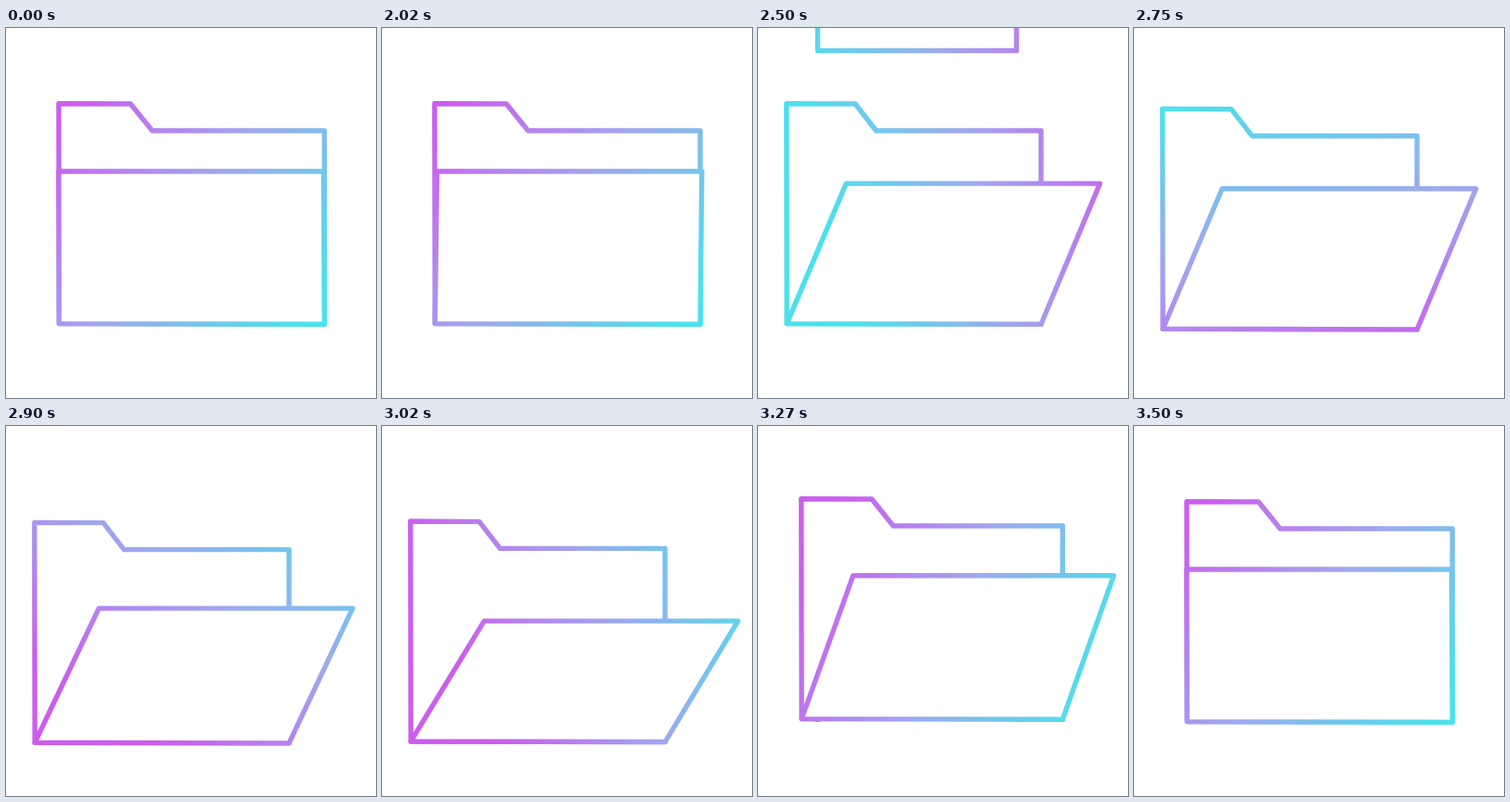
Animation, 400 px wide and 400 px high, one loop 3520 ms. Source, as an HTML page:

```html
<!DOCTYPE html>
<html lang="en">
<head>
<meta charset="utf-8">
<title>Folder</title>
<style>
  html, body { margin: 0; height: 100%; overflow: hidden; background: #fff; }
  svg { display: block; width: 100%; height: 100%; }
  path { fill: #fff; stroke: url(#tint); stroke-width: 5.4; stroke-linejoin: round; }
</style>
</head>
<body>
<svg viewBox="0 0 400 400">
  <defs>
    <linearGradient id="tint" gradientUnits="userSpaceOnUse" x1="-165" x2="165" y1="0" y2="0">
      <stop stop-color="#cb5eee"/>
      <stop offset=".5" stop-color="#9fa8ed"/>
      <stop offset="1" stop-color="#4be1ec"/>
    </linearGradient>
    <clipPath id="above"><rect width="400" height="320"/></clipPath>
  </defs>
  <path id="back"/>
  <g clip-path="url(#above)"><path id="paper"/></g>
  <path id="flap"/>
</svg>
<script>
const LOOP = 3520, START = 2020, PANEL = 165;
const [tint, back, paper, flap] =
  ['tint', 'back', 'paper', 'flap'].map(id => document.getElementById(id));

const linear = u => u;
const smooth = u => (1 - Math.cos(Math.PI * u)) / 2;
const out = u => 1 - (1 - u) ** 2;
const late = u => smooth(u ** .82);

const draw = (path, points) => path.setAttribute('d', 'M' + points.join('L') + 'Z');

function render(time) {
  const now = time % LOOP, t = now < START ? 0 : now;
  // Progress from 0 to 1 between two times
  const step = (from, to, ease = smooth) =>
    ease(Math.min(1, Math.max(0, (t - from) / (to - from))));

  const open = step(2000, 2480) - step(3020, 3460);
  const dy = 24.5 * step(2720, 2970, out) - 29.5 * step(2970, 3210) + 5 * step(3210, 3350);
  const drop = 470 * step(2440, 2800) - 8;
  const turn = 38 + 360 * step(2000, 3500, late);

  // The flap tilts about its lower edge and shortens once it passes 23 degrees.
  const tilt = (23 * step(2005, 2420, linear) + 10 * step(2800, 3100)) * (1 - step(3110, 3480));
  const length = PANEL - 1.45 * Math.max(0, tilt - 23);
  const angle = tilt * Math.PI / 180;
  const lean = length * Math.sin(angle);

  const left = 57 - 26.2 * open, right = 344.2 - 38.2 * open;
  const scale = (right - left) / 287, bottom = 320 + dy;
  const top = bottom - length * Math.cos(angle);
  const base = [[right, bottom + .2], [left + .4, bottom - .4]];

  draw(back, [
    [left, 81.7 + dy], [left + 77.5 * scale, 82 + dy], [left + 101 * scale, 111 + dy],
    [right, 111 + dy], ...base
  ]);
  draw(paper, [[64.5, drop - 150], [279.5, drop - 150], [279.5, drop], [64.5, drop]]);
  draw(flap, [[left + lean, top], [right + lean - .8, top], ...base]);
  tint.setAttribute('gradientTransform', `translate(${200 + 45 * open} 200) rotate(${turn})`);
}

function tick() {
  render(performance.now());
  requestAnimationFrame(tick);
}
tick();
</script>
</body>
</html>
```
